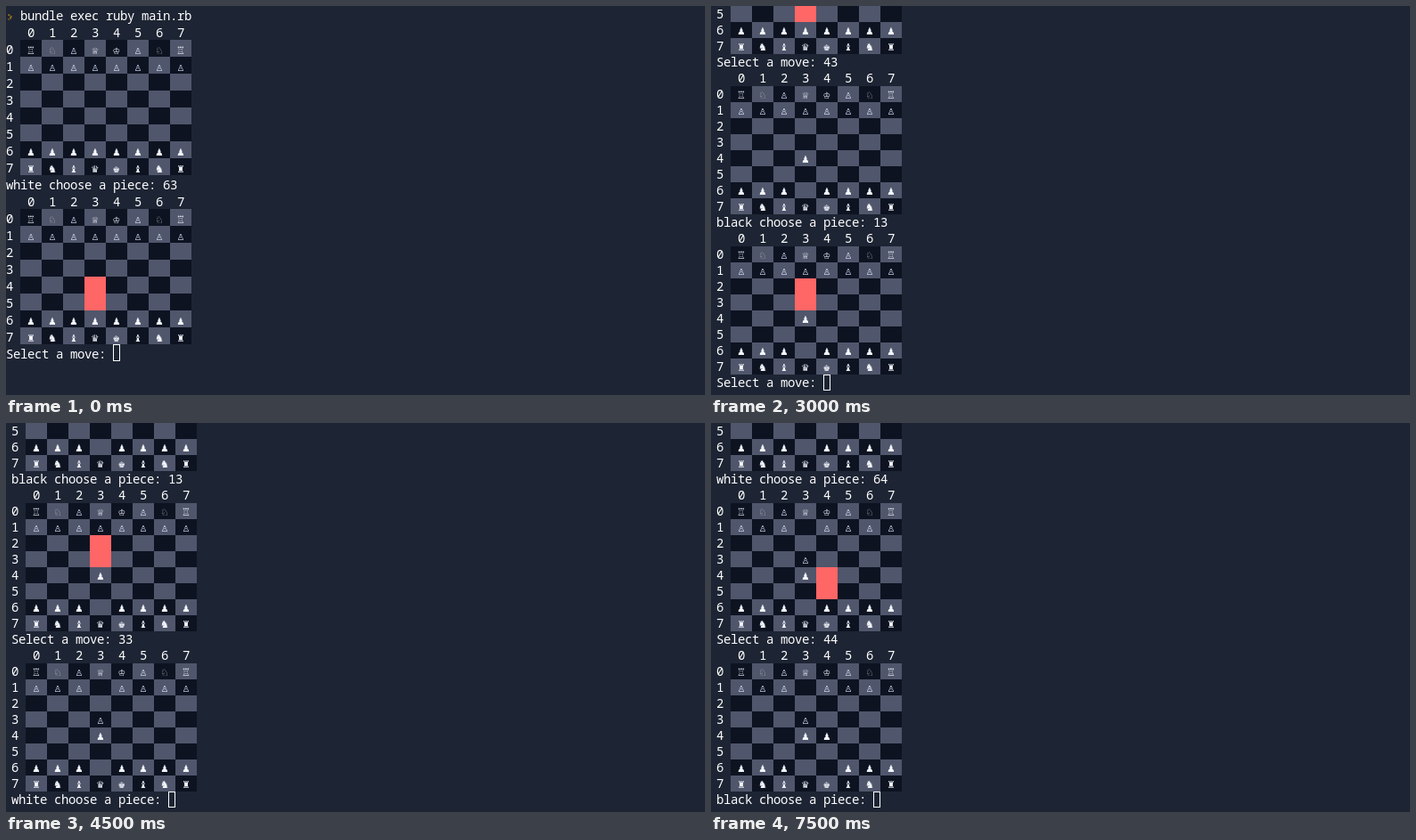
Recreate the animation shown at these times as an HTML page. Size 784x437 px, loop 8000 ms.

```html
<!DOCTYPE html>
<html lang="en">
<head>
<meta charset="utf-8">
<title>Terminal chess</title>
<style>
  html, body { margin: 0; width: 100%; height: 100%; overflow: hidden; background: #1d2433; }
  svg { display: block; }
  text { font: 14px "Noto Sans Mono", "DejaVu Sans Mono", monospace; fill: #fff; white-space: pre; }
  .piece { font: 13px "DejaVu Sans Mono", "DejaVu Sans", monospace; text-anchor: middle; fill: #f6f8ff; }
  .pawn { fill: #dbe6ff; }
  .knight { fill: #c2bfc0; }
  .screen { visibility: hidden; }
  .screen.on { visibility: visible; }
</style>
</head>
<body>
<svg id="stage" width="784" height="437" viewBox="0 0 784 437"></svg>
<script>
const COL = 8, SQUARE = 3 * COL, LOOP = 8000, STEP = 1500;
const LIGHT = '#50566b', DARK = '#0d1321', MARK = '#ff6666';
const TINT = { '♙': 'pawn', '♘': 'knight' };
const stage = document.getElementById('stage');

const start = ['♖♘♙♕♔♙♘♖', '♙♙♙♙♙♙♙♙', '', '', '', '', '♟♟♟♟♟♟♟♟', '♜♞♝♛♚♝♞♜']
  .map(row => [...row.padEnd(8)]);

function move(board, [r1, c1], [r2, c2]) {
  const next = board.map(row => [...row]);
  next[r2][c2] = board[r1][c1];
  next[r1][c1] = ' ';
  return next;
}

const turns = [
  { side: 'white', from: '63', to: '43', marks: ['43', '53'] },
  { side: 'black', from: '13', to: '33', marks: ['23', '33'] },
  { side: 'white', from: '64', to: '44', marks: ['44', '54'] },
];

// The session as terminal lines: plain text, or one rank of a board.
const log = [{ text: '  bundle exec ruby main.rb', shell: true }];

function printBoard(board, marks = []) {
  log.push({ text: '   0  1  2  3  4  5  6  7' });
  board.forEach((pieces, rank) => log.push({ text: String(rank), rank, pieces, marks }));
}

let board = start;
printBoard(board);
for (const { side, from, to, marks } of turns) {
  log.push({ text: `${side} choose a piece: `, input: from });
  printBoard(board, marks);
  log.push({ text: 'Select a move: ', input: to });
  board = move(board, from, to);
  printBoard(board);
}
log.push({ text: 'black choose a piece: ', input: '' });

// Each character sits in its own terminal column.
function textLine(str, x, y) {
  const xs = [...str].map((_, i) => x + i * COL).join(' ');
  return `<text x="${xs}" y="${y}">${str}</text>`;
}

function rankLine({ rank, pieces, marks }, x, top, base, height) {
  return pieces.map((piece, file) => {
    const left = x + 2 * COL + file * SQUARE;
    const fill = marks.includes(`${rank}${file}`) ? MARK : (rank + file) % 2 ? LIGHT : DARK;
    const square = `<rect x="${left}" y="${top}" width="${SQUARE}" height="${height}" fill="${fill}"/>`;
    if (piece === ' ') return square;
    return square +
      `<text class="piece ${TINT[piece] || ''}" x="${left + SQUARE / 2}" y="${base}">${piece}\uFE0E</text>`;
  }).join('');
}

function screen(first, last, x, height, ascent) {
  let out = '';
  for (let i = first; i <= last; i++) {
    const line = log[i], top = (i - first) * height, base = top + ascent;
    const answered = i < last ? line.input || '' : '';
    if (line.pieces) out += rankLine(line, x, top, base, height);
    out += textLine(line.text + answered, x, base);
    if (line.shell) {
      out += `<path d="M2.5 9.5L6.5 12.5L2.5 15.5" fill="none" stroke="#94701c" stroke-width="2" stroke-dasharray="2 1"/>`;
    }
    if (i === last) {
      out += `<rect x="${x + line.text.length * COL + .5}" y="${top + .5}" width="${COL - 1}" height="${height - 1}" fill="none" stroke="#fff"/>`;
    }
  }
  return `<g class="screen">${out}</g>`;
}

// The first screen has a taller line; later ones scroll by ten lines a step.
let screens = screen(0, 20, 0, 19, 16);
for (let first = 7; first <= 47; first += 10) screens += screen(first, first + 23, 6, 18, 14);
stage.innerHTML = screens;

function tick() {
  const current = Math.floor(performance.now() % LOOP / STEP);
  [...stage.children].forEach((g, i) => g.classList.toggle('on', i === current));
  requestAnimationFrame(tick);
}
tick();
</script>
</body>
</html>
```
